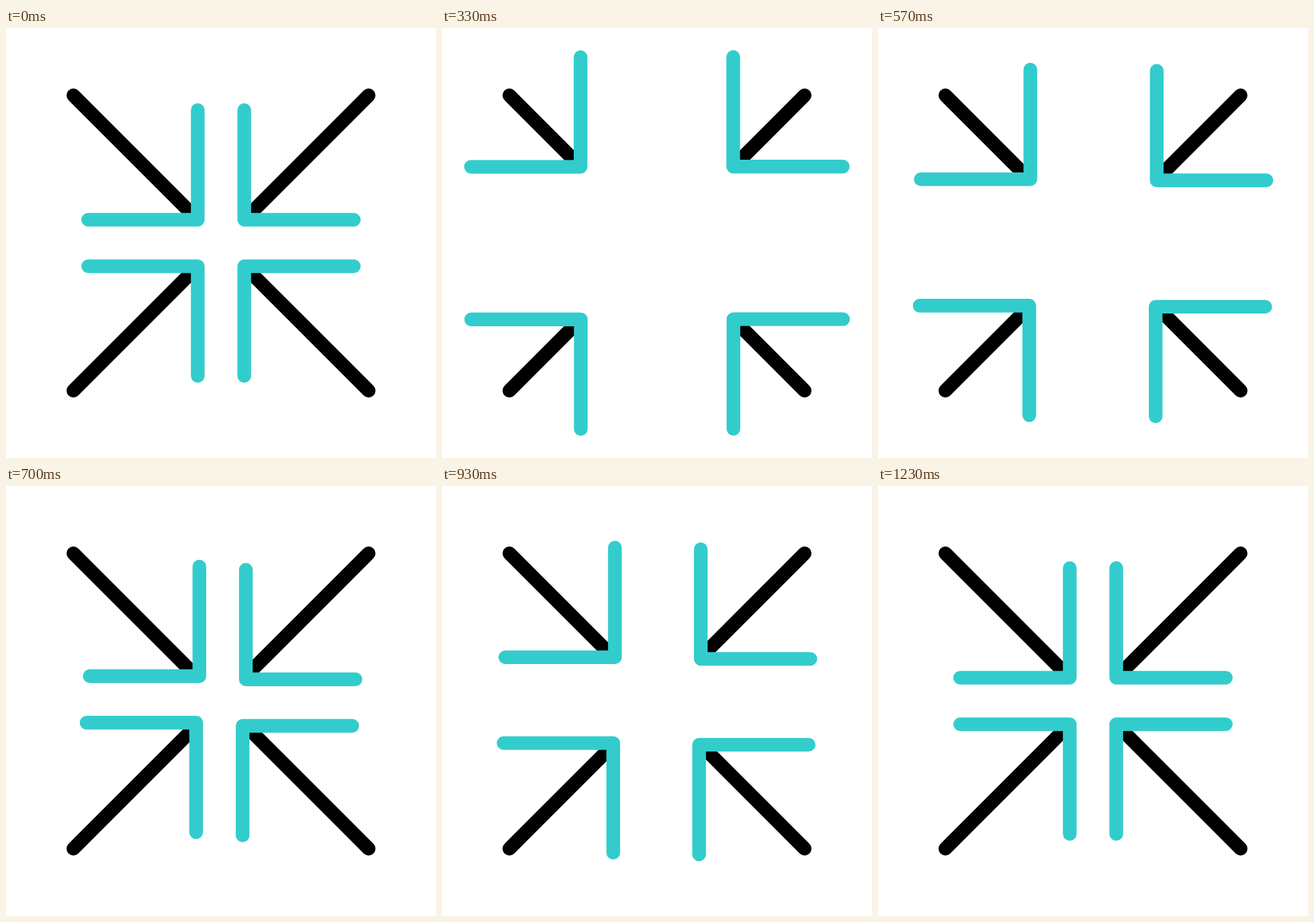
An HTML page for the animation above (2 s loop, 640x640 px).

```html
<!DOCTYPE html>
<html lang="en">
<head>
<meta charset="utf-8">
<title>Converging arrows</title>
<style>
  html, body { margin: 0; width: 100%; height: 100%; overflow: hidden; background: #fff; }
  svg { display: block; width: 100%; height: 100%; }
  path { fill: none; stroke-width: 20.4; stroke-linecap: round; stroke-linejoin: round; }
  .shaft { stroke: #000; }
  .head { stroke: #3cc; }
</style>
</head>
<body>
<svg viewBox="0 0 640 640"></svg>
<script>
const NS = 'http://www.w3.org/2000/svg';
const LOOP = 2000;
const TAIL = 100.3;   // outer end of each shaft
const REST = 285.4;   // arrow tip when closed
const ARM = 163.1;

// [step, distance outward along the diagonal, sideways drift]
const KEYS = [
  [0, 0, 0],
  [14, 97.3, -0.2],
  [21, 0, 2.4],
  [26, 58.6, 1.3],
  [30, 0, 1.2],
  [33, 26.5, 1],
  [37, 0, 0]
];

const svg = document.querySelector('svg');

function addPath(parent, name) {
  const path = document.createElementNS(NS, 'path');
  path.setAttribute('class', name);
  return parent.appendChild(path);
}

const arrows = [0, 90, 180, 270].map(angle => {
  const group = document.createElementNS(NS, 'g');
  group.setAttribute('transform', `rotate(${angle} 320 320)`);
  svg.appendChild(group);
  return { shaft: addPath(group, 'shaft'), head: addPath(group, 'head') };
});

// 30 steps per second, with starts rounded to 10 ms
function stepAt(ms) {
  const rest = ms % 100;
  return 3 * Math.floor(ms / 100) + (rest >= 70 ? 2 : rest >= 30 ? 1 : 0);
}

function poseAt(step) {
  const i = KEYS.findIndex(key => key[0] > step);
  if (i < 0) return [0, 0];
  const [t0, out0, side0] = KEYS[i - 1];
  const [t1, out1, side1] = KEYS[i];
  const k = 0.5 - 0.5 * Math.cos(Math.PI * (step - t0) / (t1 - t0));
  return [out0 + (out1 - out0) * k, side0 + (side1 - side0) * k];
}

function draw(ms) {
  const [out, side] = poseAt(stepAt(ms));
  const x = REST - out + side;
  const y = REST - out - side;
  const end = REST - out - 3;
  const shaft = `M${TAIL} ${TAIL}L${end} ${end}`;
  const head = `M${x - ARM} ${y}H${x}V${y - ARM}`;
  for (const arrow of arrows) {
    arrow.shaft.setAttribute('d', shaft);
    arrow.head.setAttribute('d', head);
  }
}

const start = performance.now();
function tick() {
  draw((performance.now() - start) % LOOP);
  requestAnimationFrame(tick);
}
tick();
</script>
</body>
</html>
```
